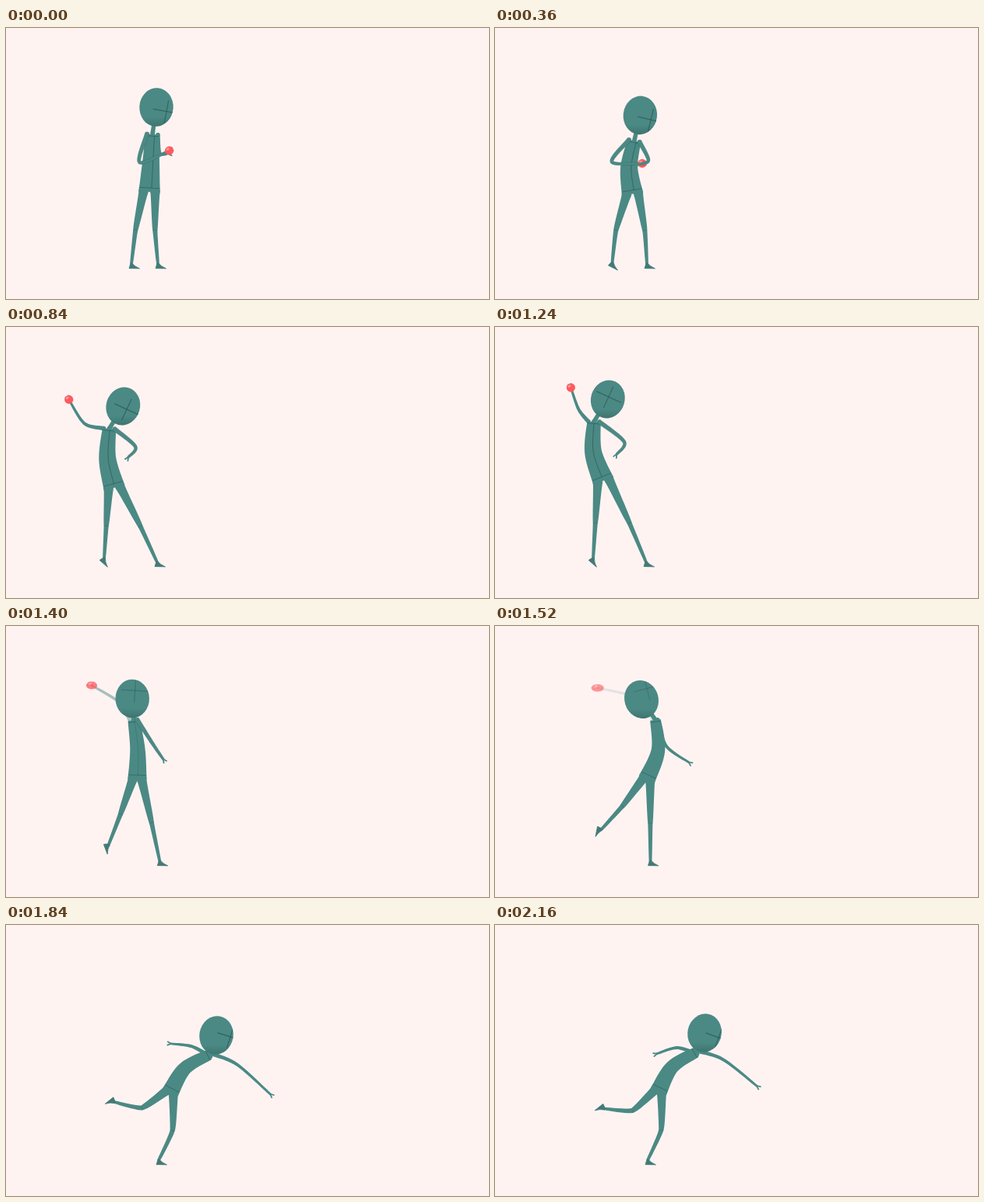
Animation of 620 by 349 pixels, one loop 2200 ms. Source, as an HTML page with a canvas:

```html
<!DOCTYPE html>
<html lang="en">
<head>
<meta charset="utf-8">
<title>Throw</title>
<style>
html, body { margin: 0; width: 100%; height: 100%; overflow: hidden; background: #fff3f2; }
canvas { display: block; }
</style>
</head>
<body>
<canvas id="stage" width="620" height="349"></canvas>
<script>
const ctx = document.getElementById('stage').getContext('2d');
const LOOP = 2200, STEP = 40, RELEASE = 1620, BALL_SPEED = 5;
const PAPER = '#fff3f2', SKIN = '#4b8984', DARK = '#2b5855', SHOE = '#427a76', RED = '#ff5a5e';

// Key poses. Arms: hand angle and reach from the chest, elbow bend.
// Legs: ankle, knee bend, foot angle. Spine: bend. Turn: 0 front, 1 side.
const stand = {
  head: [193, 102], gaze: [13, 5.5], chest: [188, 137], hips: [184, 211], spine: [0], turn: [0], fade: [1],
  armL: [44, 30, 35], armR: [51, 32, 9], legL: [161, 304, 2, 0], legR: [195, 304, 2, 0]
};
const gather = {
  ...stand, head: [177, 118], gaze: [14, 6], chest: [166, 150], hips: [166, 215], spine: [8.5],
  armL: [108, 32, 30], armR: [95, 30, -24], legL: [139, 300, 5, 40], legR: [195, 304, -5, 0]
};
const raise = {
  ...stand, head: [150.3, 102], gaze: [4.7, 4], chest: [132.5, 131], hips: [139, 207], spine: [5.5],
  armL: [216, 64, -11], armR: [56, 44, -14], legL: [126, 298, 0, 40], legR: [194, 303, -1, 0]
};
const aim = {
  ...raise, head: [144.8, 93], gaze: [1, -3], chest: [127, 122], hips: [139, 198], spine: [7],
  armL: [236, 53, -4], armR: [55, 51, -16]
};
const step = {
  head: [188, 94.5], gaze: [7, -14], chest: [206, 121], hips: [195, 197], spine: [-9], turn: [1], fade: [.15],
  armL: [209, 85, 14], armR: [52, 69, 11], legL: [136.5, 262, -2, 100], legR: [199.5, 303, 0, 0]
};
const lunge = {
  ...step, head: [270, 142], gaze: [18, 2], chest: [261, 167], hips: [211, 215], spine: [9], fade: [1],
  armL: [393, 93, -8], armR: [196, 51, 5], legL: [139, 228, -15, 140], legR: [196, 303, -9, 0]
};
const settle = {
  ...lunge, head: [269, 139], gaze: [18, 6], chest: [258, 164], hips: [210, 214],
  armL: [389, 89, -8], armR: [178, 50, 8], legL: [140, 236.5, -15, 140]
};
const keys = [[0, stand], [600, gather], [840, raise], [1240, aim], [1520, step], [1720, lunge], [1840, lunge], [2160, settle]];

const ease = (a, b) => a * b <= 0 ? 0 : 2 * a * b / (a + b);

// Smooth pose at time t, without overshoot.
function poseAt(t) {
  const last = keys.length - 1;
  let k = 0;
  while (k < last - 1 && t >= keys[k + 1][0]) k++;
  const h = keys[k + 1][0] - keys[k][0], u = (t - keys[k][0]) / h, v = 1 - u;
  const pose = {};
  for (const part in stand) {
    pose[part] = stand[part].map((_, i) => {
      const val = n => keys[n][1][part][i];
      const slope = n => (val(n + 1) - val(n)) / (keys[n + 1][0] - keys[n][0]);
      const m = k ? ease(slope(k - 1), slope(k)) : 0;
      const n = k + 1 < last ? ease(slope(k), slope(k + 1)) : 0;
      return val(k) * (1 + 2 * u) * v * v + val(k + 1) * u * u * (3 - 2 * u) + h * u * v * (m * v - n * u);
    });
  }
  return pose;
}

const mix = (a, b, f) => [a[0] + (b[0] - a[0]) * f, a[1] + (b[1] - a[1]) * f];
const shift = ([x, y], [dx, dy], f = 1) => [x + dx * f, y + dy * f];
const polar = (deg, r) => [Math.cos(deg * Math.PI / 180) * r, Math.sin(deg * Math.PI / 180) * r];

// Unit vector across the way from a to b.
function across(a, b) {
  const dx = b[0] - a[0], dy = b[1] - a[1], d = Math.hypot(dx, dy) || 1;
  return [-dy / d, dx / d];
}
const joint = (a, b, f, bend) => shift(mix(a, b, f), across(a, b), bend);
const handAt = (pose, arm) => shift(pose.chest, polar(arm[0], arm[1]));

function line(width, alpha, pts, color = DARK) {
  ctx.globalAlpha = alpha;
  ctx.strokeStyle = color;
  ctx.lineWidth = width;
  ctx.beginPath();
  pts.forEach(p => ctx.lineTo(...p));
  ctx.stroke();
  ctx.globalAlpha = 1;
}

// Points along a curve through its joints, each with the width there.
function curve(pts, widths, soft, n = 10) {
  const end = pts.length - 1, out = [];
  const tangent = (i, c) => (pts[Math.min(i + 1, end)][c] - pts[Math.max(i - 1, 0)][c]) * soft;
  for (let i = 0; i < end; i++) {
    for (let j = i ? 1 : 0; j <= n; j++) {
      const u = j / n, v = 1 - u;
      const [x, y] = [0, 1].map(c => pts[i][c] * (1 + 2 * u) * v * v + pts[i + 1][c] * u * u * (3 - 2 * u)
        + u * v * (tangent(i, c) * v - tangent(i + 1, c) * u));
      out.push([x, y, widths[i] * v + widths[i + 1] * u]);
    }
  }
  return out;
}

// Tapered shape around a curve, with round joints if wanted.
function limb(path, color, round = true) {
  const sides = path.map((p, i) => across(path[Math.max(i - 1, 0)], path[Math.min(i + 1, path.length - 1)]));
  const edge = sign => path.map((p, i) => shift(p, sides[i], sign * p[2] / 2));
  ctx.fillStyle = color;
  ctx.beginPath();
  edge(1).concat(edge(-1).reverse()).forEach(p => ctx.lineTo(...p));
  ctx.closePath();
  for (let i = 0; round && i < path.length; i += 10) {
    const [x, y, w] = path[i];
    ctx.moveTo(x + w / 2, y);
    ctx.arc(x, y, w / 2, 0, 2 * Math.PI, true);
  }
  ctx.fill();
}

function drawArm(pose, arm, shoulder, fraction, alpha, front) {
  const hand = handAt(pose, arm), elbow = joint(shoulder, hand, fraction, arm[2]);
  const path = curve([shoulder, elbow, hand], [5.5, 4, 2.8], .45);
  if (front) {
    ctx.globalAlpha = .5;
    limb(path.map(([x, y, w]) => [x, y, w + .8]), DARK);
  }
  ctx.globalAlpha = alpha;
  limb(path, SKIN);
  const turn = Math.atan2(hand[1] - elbow[1], hand[0] - elbow[0]) * 180 / Math.PI;
  for (const spread of [-26, 24]) line(1.8, alpha, [hand, shift(hand, polar(turn + spread, 5))], SKIN);
}

function drawLeg(hip, [x, y, bend, angle]) {
  const ankle = [x, y], knee = joint(hip, ankle, .53, bend), side = across(hip, knee);
  limb(curve([hip, knee, ankle], [12.5, 6.2, 3.6], .22), SKIN);
  line(.8, .4, [shift(knee, side, -2.6), shift(knee, side, 2.6)]);
  ctx.save();
  ctx.translate(x, y);
  ctx.rotate(angle * Math.PI / 180);
  ctx.fillStyle = ctx.strokeStyle = SHOE;
  ctx.beginPath();
  ctx.moveTo(-1, -1);
  ctx.lineTo(-3, 5.5);
  ctx.lineTo(10.5, 5.8);
  ctx.quadraticCurveTo(4, 3, 1, -1);
  ctx.closePath();
  ctx.fill();
  ctx.stroke();
  ctx.restore();
}

function drawTorso(pose, spine, turn) {
  limb(curve([pose.chest, pose.head], [6, 4], .5), SKIN);
  limb(spine, SKIN, false);
  const seam = pose.gaze[0] * .2;
  line(1, .7 * (1 - turn), spine.slice(1, 19).map(([x, y]) => [x + seam, y]));
  for (const i of [1, 18]) {
    const n = across(spine[i - 1], spine[i + 1]), half = spine[i][2] / 2 - 1;
    line(1, .6, [shift(spine[i], n, -half), shift(spine[i], n, half)]);
  }
}

function drawHead({ head: [x, y], chest, gaze }) {
  const tilt = Math.atan2(x - chest[0], chest[1] - y) * .5;
  const shade = ctx.createLinearGradient(x, y - 25, x, y + 25);
  shade.addColorStop(.75, SKIN);
  shade.addColorStop(1, '#3d746f');
  ctx.save();
  ctx.fillStyle = shade;
  ctx.beginPath();
  ctx.ellipse(x, y, 21.7, 24.8, tilt, 0, 7);
  ctx.fill();
  ctx.clip();
  ctx.translate(x + gaze[0], y + gaze[1]);
  ctx.rotate(tilt * 1.2 + .1);
  const alpha = .75 - .03 * Math.max(0, -gaze[1]);
  line(1.3, alpha, [[-17, 0], [17, 0]]);
  line(1.2, alpha, [[0, -14], [0, 15]]);
  ctx.restore();
}

function drawBall(t, pose) {
  const flight = Math.max(0, t - RELEASE);
  const from = flight ? poseAt(RELEASE) : pose;
  const [x, y] = shift(handAt(from, from.armL), [BALL_SPEED, .05], flight);
  const blur = flight ? .5 : 1 - pose.fade[0];
  ctx.globalAlpha = 1 - blur * .45;
  ctx.fillStyle = RED;
  ctx.beginPath();
  ctx.ellipse(x, y, 5.6 + blur * 3, 5.6 - blur, 0, 0, 7);
  ctx.fill();
  ctx.globalAlpha = .35;
  ctx.fillStyle = '#fff';
  ctx.beginPath();
  ctx.ellipse(x - 2, y - 2, 2.2, 1.6, -.6, 0, 7);
  ctx.fill();
  ctx.globalAlpha = 1;
}

function draw(t) {
  const pose = poseAt(t), { chest, hips } = pose, turn = pose.turn[0];
  const girth = 1 - .2 * turn;
  const waist = joint(chest, hips, .5, pose.spine[0]);
  const spine = curve([chest, waist, hips], [17, 22, 28].map(w => w * girth), .5);
  const shoulders = across(chest, waist), pelvis = across(waist, hips);
  const armGap = 7 * (1 - .6 * turn), legGap = 7.5 * (1 - .4 * turn);
  const frontL = t < 680, frontR = t >= 320 && t < 1440;
  const left = front => drawArm(pose, pose.armL, shift(chest, shoulders, armGap), .4, pose.fade[0], front);
  const right = front => drawArm(pose, pose.armR, shift(chest, shoulders, -armGap), .8 - .3 * turn, 1, front);

  ctx.fillStyle = PAPER;
  ctx.fillRect(0, 0, 620, 349);
  ctx.lineCap = ctx.lineJoin = 'round';
  ctx.globalAlpha = 1;
  if (!frontL) left();
  if (!frontR) right();
  drawLeg(shift(hips, pelvis, legGap), pose.legL);
  drawLeg(shift(hips, pelvis, -legGap), pose.legR);
  drawTorso(pose, spine, turn);
  if (frontL) left(true);
  drawBall(t, pose);
  if (frontR) right(true);
  drawHead(pose);
}

function tick() {
  draw(Math.floor(performance.now() % LOOP / STEP) * STEP);
  requestAnimationFrame(tick);
}
tick();
</script>
</body>
</html>
```
